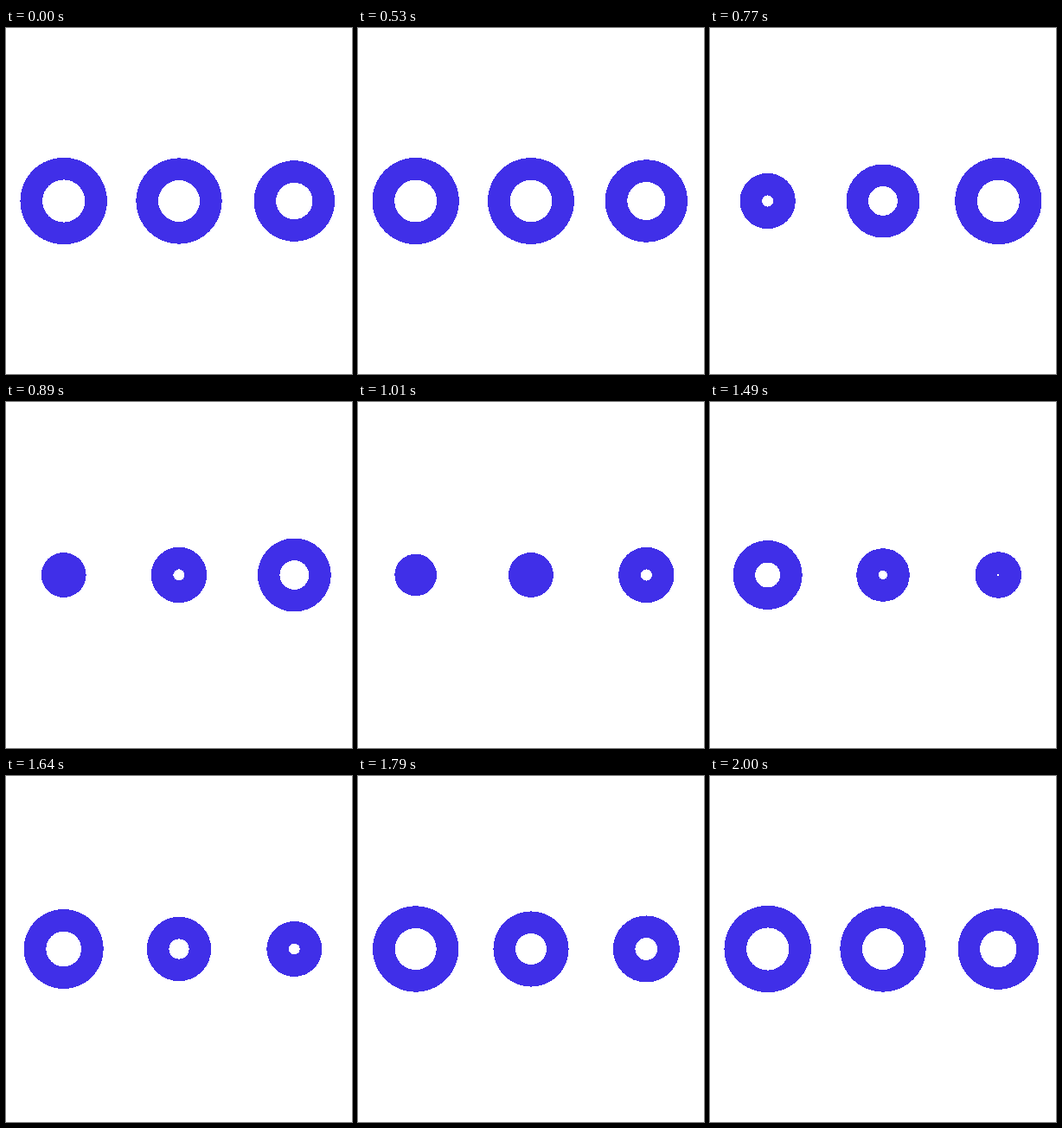
Animation, 400 px wide and 400 px high, one loop 2030 ms. Source, as an HTML page:

```html
<!DOCTYPE html>
<html lang="en">
<head>
<meta charset="utf-8">
<title>Pulsing rings</title>
<style>
  html, body { margin: 0; height: 100%; overflow: hidden; background: #fff; }
  svg { display: block; width: 100%; height: 100%; }
  circle { shape-rendering: crispEdges; }
</style>
</head>
<body>
<svg viewBox="0 0 400 400"></svg>
<script>
const LOOP = 2030, HOLD = 500, STEP = 30, CYCLE = LOOP - HOLD - STEP;
const MIN = 24.2, MAX = 50.2, BAND = 25.6;
const SHRINK = 545, GROW = 880;

const svg = document.querySelector("svg");

function addCircle(cx, fill) {
  const circle = document.createElementNS(svg.namespaceURI, "circle");
  circle.setAttribute("cx", cx);
  circle.setAttribute("cy", 200);
  circle.setAttribute("fill", fill);
  svg.append(circle);
  return circle;
}

// Rings start to shrink 120 ms apart; each grows back from its own moment.
const rings = [485, 700, 820].map((growAt, i) => {
  const cx = 200 + (i - 1) * 400 / 3;
  return {
    growAt,
    shrinkAt: 17 + 120 * i,
    disc: addCircle(cx, "#402fe8"),
    hole: addCircle(cx, "#fff")
  };
});

const progress = (time, start, duration) =>
  Math.min(1, Math.max(0, (time - start) / duration));
const smooth = x => x * x * (3 - 2 * x);
const slowEnd = x => smooth(1 - (1 - x) ** 1.6);

function radiusAt({ shrinkAt, growAt }, time) {
  const t = time < shrinkAt ? time + CYCLE : time;
  const level = 1 - slowEnd(progress(t, shrinkAt, SHRINK))
    + smooth(progress(t, growAt, GROW));
  return MIN + (MAX - MIN) * level;
}

const start = performance.now();

function draw() {
  const elapsed = (performance.now() - start) % LOOP;
  const time = Math.floor(Math.max(0, elapsed - HOLD) / STEP) * STEP;
  for (const ring of rings) {
    const radius = radiusAt(ring, time);
    ring.disc.setAttribute("r", radius);
    ring.hole.setAttribute("r", Math.max(0, radius - BAND));
  }
  requestAnimationFrame(draw);
}
draw();
</script>
</body>
</html>
```
